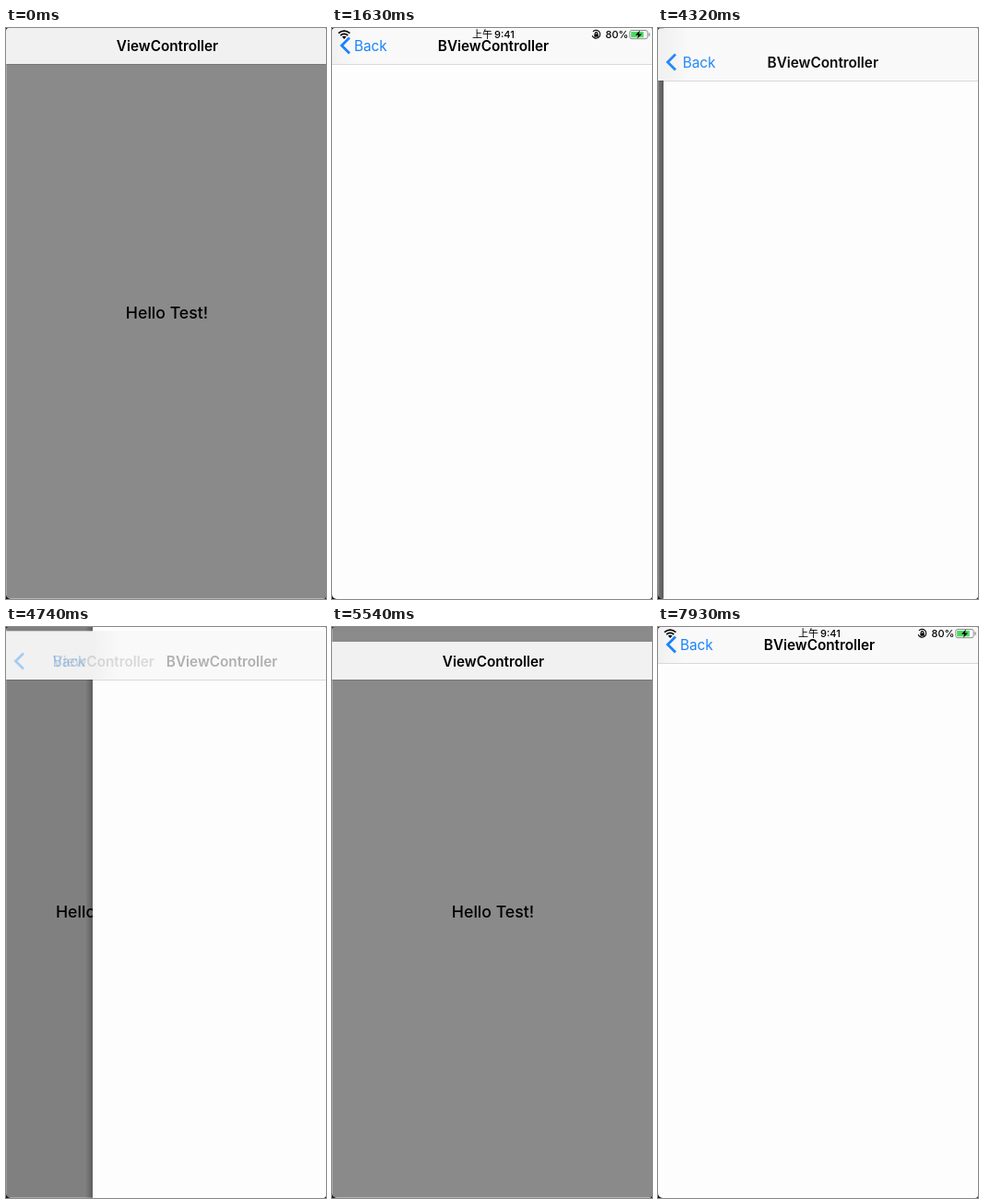
These frames come from a looping animation (347 by 619 pixels, 8000 ms). An HTML page with a canvas:

```html
<!DOCTYPE html>
<html lang="en">
<head>
<meta charset="utf-8">
<title>Navigation transition</title>
<style>
  html, body { margin: 0; width: 100%; height: 100%; overflow: hidden; background: #000; }
  canvas { display: block; width: 347px; height: 619px; }
</style>
</head>
<body>
<canvas></canvas>
<script>
const W = 347, H = 619, LOOP = 8000;
const BLUE = '#1b84fa';
const SANS = 'Inter, Roboto, sans-serif';
const canvas = document.querySelector('canvas');
const ctx = canvas.getContext('2d');
const scale = window.devicePixelRatio || 1;
canvas.width = Math.round(W * scale);
canvas.height = Math.round(H * scale);

// Left edge of the second page while a finger drags it: [ms, x]
const DRAG = [
  [2550, 4], [2910, 34], [3090, 24], [3150, 12], [3210, 4], [3260, 0],
  [4269, 0], [4270, 6], [4500, 40], [4740, 94], [5040, 215], [5100, 255],
  [5160, 300], [5220, 325], [5280, 338], [5380, W]
];

const clamp = v => Math.max(0, Math.min(1, v));
const hold = (t, start, step) => start + Math.floor((t - start) / step + 1e-6) * step;

function along(keys, t) {
  const i = keys.findIndex(key => key[0] > t);
  if (i < 0) return keys[keys.length - 1][1];
  if (i === 0) return keys[0][1];
  const [t0, x0] = keys[i - 1], [t1, x1] = keys[i];
  return x0 + (x1 - x0) * (t - t0) / (t1 - t0);
}

// Critically damped spring, already moving on its first visible step
function pushEdge(t) {
  if (t >= 450) return 0;
  const k = 18.25 * (hold(t, 0, 57) + 54) / 1000;
  return W * (1 + k) * Math.exp(-k);
}

function stateAt(t) {
  if (t < 500) return { x: W, lowered: false, status: false };
  if (t < 2550) return { x: pushEdge(t - 500), lowered: false, status: true };
  if (t >= 7470) return { x: pushEdge(t - 7470), lowered: false, status: true };
  const time = t < 2910 ? hold(t, 2550, 72)
    : t < 3090 ? 2910
    : t >= 4270 && t < 5100 ? hold(t, 4270, 58.75)
    : t >= 5100 && t < 5380 ? hold(t, 5100, 56) : t;
  const x = t >= 2910 && t < 3090 ? 34 : along(DRAG, time);
  return { x, lowered: true, status: false };
}

function rect(x, y, w, h, fill) {
  ctx.fillStyle = fill;
  ctx.fillRect(x, y, w, h);
}

function text(str, x, y, font, color = '#000', align = 'left', alpha = 1) {
  ctx.globalAlpha = clamp(alpha);
  ctx.font = font;
  ctx.fillStyle = color;
  ctx.textAlign = align;
  ctx.fillText(str, x, y);
  ctx.globalAlpha = 1;
}

function stroke(d, color, width) {
  ctx.strokeStyle = color;
  ctx.lineWidth = width;
  ctx.stroke(new Path2D(d));
}

function drawPages(x) {
  const hidden = 1 - x / W;
  if (x > 0) {
    rect(0, 0, x, H, '#8b8a8b');
    ctx.save();
    ctx.beginPath();
    ctx.rect(0, 0, x, H);
    ctx.clip();
    text('Hello Test!', 174.5 - 0.3 * (W - x), 315, `500 17.7px ${SANS}`, '#000', 'center');
    ctx.restore();
    rect(0, 0, 1, H, 'rgba(255,255,255,.25)');
    rect(0, H - 1, x, 1, 'rgba(255,255,255,.35)');
    rect(0, 0, x, H, `rgba(0,0,0,${0.1 * hidden})`);
  }
  if (x < W) {
    const shadow = ctx.createLinearGradient(x - 8, 0, x, 0);
    shadow.addColorStop(0, 'rgba(0,0,0,0)');
    shadow.addColorStop(1, 'rgba(0,0,0,.27)');
    rect(x - 8, 0, 8, H, shadow);
    rect(x, 0, W - x, H, '#fdfdfd');
  }
}

function drawBar(x, lowered) {
  const r = x / W;
  const bottom = lowered ? 57 : 39;
  const top = lowered ? 16 * r : 0;
  const mid = bottom - 20;
  const base = mid + 5.5;
  const span = lowered ? 218 : 248;
  const backSpan = lowered ? 95 : 70;
  const titleFont = `600 15.3px ${SANS}`;

  const tint = ctx.createLinearGradient(x, 0, x + 28, 0);
  tint.addColorStop(0, '#f1f1f1');
  tint.addColorStop(1, '#f9f9f9');
  rect(0, top, W, bottom - top, tint);
  rect(0, bottom, W, 1, 'rgba(0,0,0,.14)');

  text('ViewController', 175 - backSpan * (1 - r), base, titleFont, '#000', 'center',
    lowered ? r ** 1.6 : (r - 0.1) * 1.3);
  text('BViewController', 175 + span * r, base, titleFont, '#000', 'center',
    lowered ? 1 - 2.6 * r : (1 - r) * 0.9 + 0.1 * (r === 0));
  text('Back', 24 + backSpan * r + (lowered ? 1 : 0), base, `400 15.3px ${SANS}`, BLUE, 'left',
    1 - (lowered ? 2.4 : 1.4) * r);

  ctx.globalAlpha = clamp(1 - (lowered ? 2.4 : 1) * r);
  stroke(`M19 ${mid - 8.5}L10.5 ${mid}L19 ${mid + 8.5}`, BLUE, 2.8);
  ctx.globalAlpha = 1;
}

function drawStatus() {
  const font = `500 11px ${SANS}`;
  text('上午', 152, 11, '500 11px "Noto Sans CJK SC", "Noto Sans CJK", sans-serif');
  text('9:41', 176, 11, font);
  text('80%', 296.5, 11, font);

  // Wi-Fi
  stroke('M7 5.6Q13.2 .6 19.4 5.6M9.2 8Q13.2 4.8 17.2 8', '#000', 1.7);
  ctx.fillStyle = '#000';
  ctx.fill(new Path2D('M10.9 9.6Q13.2 7.9 15.5 9.6L13.2 12Z'));

  // Rotation lock
  stroke('M283 3.9A4.4 4.4 0 1 1 282.2 8.2M285.2 6.8V6A1.4 1.4 0 0 1 288 6V6.8', '#000', 1.1);
  rect(284.4, 6.5, 4.4, 3.2, '#000');

  // Battery
  ctx.beginPath();
  ctx.roundRect(322.8, 2.5, 19.4, 9.2, 2.2);
  ctx.strokeStyle = '#8d8d8d';
  ctx.lineWidth = 1;
  ctx.stroke();
  rect(324.2, 3.9, 13.6, 6.4, '#4cd964');
  rect(343.4, 5.4, 1.3, 3.4, '#8d8d8d');
  ctx.fillStyle = '#000';
  ctx.fill(new Path2D('M334 2.6L329 7.8H332.2L331 11.8L336 6.4H332.9Z'));
}

function drawCorners() {
  ctx.beginPath();
  ctx.rect(0, 0, W, H);
  ctx.roundRect(0, 0, W, H, [3, 1, 3, 5]);
  ctx.fillStyle = '#111';
  ctx.fill('evenodd');
}

function draw(t) {
  const { x, lowered, status } = stateAt(t);
  ctx.setTransform(scale, 0, 0, scale, 0, 0);
  drawPages(x);
  drawBar(x, lowered);
  if (status) drawStatus();
  drawCorners();
}

const started = performance.now();
function tick() {
  draw((performance.now() - started) % LOOP);
  requestAnimationFrame(tick);
}
tick();
</script>
</body>
</html>
```
